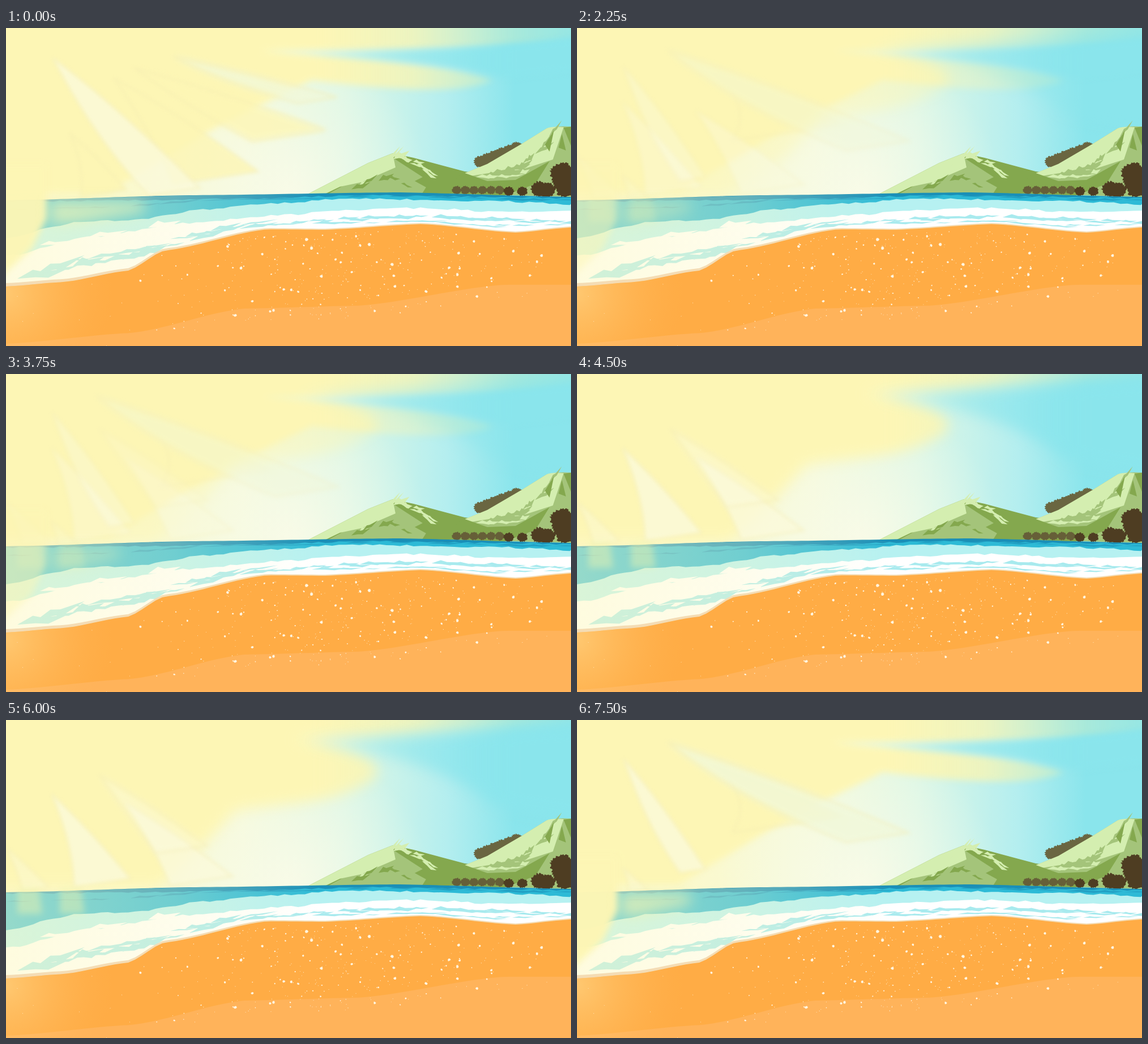
Write an HTML page that moves like this. It is 998 px wide and 561 px high and loops after 8 s.

```html
<!DOCTYPE html>
<html lang="en">
<head>
<meta charset="utf-8">
<title>Sunlit beach</title>
<style>
  html, body { margin: 0; width: 100%; height: 100%; overflow: hidden; background: #fdf6b5; }
  svg { display: block; width: 100%; height: 100%; }
</style>
</head>
<body>
<script>
const STEP = 750, LOOP = 8000, WIDTH = 998, HEIGHT = 561;
const YELLOW = '#fdf6b5', PALE = '#fbfadb', MINT = '#f1f8d9', BLUE = '#8ae5ec';
const DEEP = '#1a8fb7', TEAL = '#2dbad6', AQUA = '#b6f1f1', FOAM_SHADE = '#a8eaee';
const LEAF_LIGHT = '#d4eeb0', LEAF_MID = '#a4c47a', LEAF_DARK = '#84a84e';

let seed = 11;
const random = () => (seed = (seed * 16807) % 2147483647) / 2147483647;
const spread = amount => (random() * 2 - 1) * amount;
const times = (n, make) => Array.from({ length: n }, (_, i) => make(i)).join('');
const parse = text => text.split(' ').map(pair => pair.split(',').map(Number));
const path = (d, fill, extra = '') => `<path d="${d}" fill="${fill}" ${extra}/>`;
const soft = (d, fill, blur, opacity = 1) => path(d, fill, `filter="url(#blur${blur})" opacity="${opacity}"`);
const below = d => `${d}V${HEIGHT}H0Z`;

// Eased height along a few key points.
function heightAt(points, x) {
  const i = Math.max(1, points.findIndex(p => p[0] >= x));
  const [x0, y0] = points[i - 1], [x1, y1] = points[i], f = (x - x0) / (x1 - x0);
  return y0 + (y1 - y0) * (f + f * f * (3 - 2 * f)) / 2;
}

// Edge across the whole stage; jitter makes it look torn.
function edge(text, jitter = 0, shift = () => 0) {
  const points = parse(text);
  let d = '';
  for (let x = 0; x < WIDTH + 12; x += 12) {
    const px = Math.min(x, WIDTH);
    d += `${d ? 'L' : 'M'}${px} ${heightAt(points, px) + spread(jitter) + shift(px)}`;
  }
  return d;
}

// Thin ragged slivers scattered along a line of key points.
function slivers(text, step, length, thick) {
  const points = parse(text);
  let d = '';
  for (let x = points[0][0]; x < points.at(-1)[0]; x += step * (.6 + random() * .8)) {
    const slope = heightAt(points, Math.min(x + 1, points.at(-1)[0])) - heightAt(points, x);
    const l = length * (.5 + random()), t = thick * (.5 + random());
    const by = (f, rise) => `l${l * f} ${l * f * slope + rise}`;
    d += `M${x} ${heightAt(points, x) + spread(thick / 2)}` +
      by(.3, -t) + by(.2, t / 2) + by(.5, 0) + by(-.4, t) + by(-.25, -t / 3) + 'Z';
  }
  return d;
}

// Irregular round blob, used for pebbles and leaves.
const blob = (x, y, rx, ry, corners, rough) => 'M' + Array.from({ length: corners }, (_, i) => {
  const angle = i * 2 * Math.PI / corners, size = 1 + spread(rough);
  return `${x + Math.cos(angle) * rx * size} ${y + Math.sin(angle) * ry * size}`;
}).join('L') + 'Z';

const bushes = (n, from, to, r, fill) => path(times(n, i => {
  const f = n > 1 ? i / (n - 1) : 0;
  return blob(from[0] + (to[0] - from[0]) * f, from[1] + (to[1] - from[1]) * f, r * 1.15, r, 60, .13);
}), fill);

// Bent ray of light with a faint crease along its rim.
function blade(x, y, dx, dy, width, fill, blur = 3, opacity = .8) {
  const d = `M${x} ${y}q${dx * .45} ${dy * .38} ${dx} ${dy}l${-width} ${width * .15}Q${x + dx * .28} ${y + dy * .62} ${x} ${y}Z`;
  return soft(d, fill, blur, opacity) +
    `<path d="${d}" fill="none" stroke="#f3ebb2" stroke-width="4" filter="url(#blur3)" opacity=".4"/>`;
}

const stops = list => list.map(([at, color, alpha = 1]) =>
  `<stop offset="${at}" stop-color="${color}" stop-opacity="${alpha}"/>`).join('');
const across = (id, list) =>
  `<linearGradient id="${id}" gradientUnits="userSpaceOnUse" x1="0" x2="${WIDTH}" y1="0" y2="0">${stops(list)}</linearGradient>`;
const glow = (id, x, y, r, list) =>
  `<radialGradient id="${id}" gradientUnits="userSpaceOnUse" cx="${x}" cy="${y}" r="${r}">${stops(list)}</radialGradient>`;

const defs = '<defs>' +
  [3, 6, 12, 22].map(b => `<filter id="blur${b}" filterUnits="userSpaceOnUse" x="-100" y="-100" width="1200" height="760"
    color-interpolation-filters="sRGB"><feGaussianBlur stdDeviation="${b}"/></filter>`).join('') +
  across('sky', [[0, '#fdf8c4'], [.42, '#f8fad8'], [.6, '#def7e5'], [.78, '#b4eeef'], [.9, BLUE]]) +
  across('beam', [[0, YELLOW], [.55, YELLOW], [.72, '#f3f4b8', .85], [.86, '#d8f0c0', .5], [1, '#b8ecd0', .3]]) +
  across('gap', [[.5, BLUE, 0], [.7, BLUE, .55], [.9, BLUE]]) +
  across('haze', [[0, '#fdf8be', .5], [.3, '#fdf8c4', .32], [.56, '#fdf9d0', 0]]) +
  glow('mist', 500, 290, 250, [[0, '#fafbe8', .9], [1, '#f0faee', 0]]) +
  glow('warm', 0, 468, 190, [[0, '#ffe49c', .5], [1, '#ffb95a', 0]]) +
  '</defs>';

// Yellow cloud tongues split by a blue gap.
const tongues =
  soft('M-60 -60H1060V10C900 42 620 36 450 40C600 55 780 62 860 92C800 122 640 104 540 92L380 170 180 290H-60Z', 'url(#beam)', 6) +
  soft('M520 46C700 38 880 40 1040 12V70L880 88C760 56 640 56 520 46Z', 'url(#gap)', 6);
// One broad yellow body reaching down to the given edge.
const body = edgeX =>
  soft(`M-60 -60H1060V0C880 24 660 26 510 34C600 48 680 70 650 104C580 150 500 145 ${edgeX + 60} 160L${edgeX} 225 270 295H-60Z`, 'url(#beam)', 12) +
  soft('M520 40C680 28 860 24 1040 4V180L860 150C780 80 640 52 520 40Z', 'url(#gap)', 12);
const peaks = blade(80, 130, 140, 150, 100, PALE) + blade(210, 146, 190, 130, 110, PALE) + blade(0, 225, 75, 70, 45, PALE, 3, .4);

const skies = {
  A: tongues + blade(225, 70, 340, 110, 130, YELLOW, 6) + blade(295, 50, 290, 72, 70, MINT, 6) +
    blade(190, 88, 255, 165, 150, YELLOW) + blade(82, 52, 260, 230, 90, PALE) + blade(112, 185, 100, 100, 80, YELLOW),
  C: body(370) + peaks,
  K: body(345) + peaks + blade(165, 97, 190, 125, 90, PALE, 6, .45),
  D: tongues + blade(250, 85, 215, 85, 190, YELLOW, 6) + blade(160, 39, 425, 160, 110, MINT, 6) +
    blade(82, 68, 145, 195, 45, PALE) + blade(80, 260, 45, 40, 35, PALE, 3, .4),
  E: body(345) + soft('M-60 -60H440L480 130 300 300H-60Z', '#fefcce', 22, .8) +
    blade(-20, 30, 242, 185, 90, '#fbf6b9') + blade(290, 20, 195, 50, 90, '#faf6b9', 6) + blade(90, 150, 70, 140, 65, '#fffde4', 12)
};

const sun = opacity => soft('M-60 240H72V335L45 390 -10 440H-60Z', YELLOW, 6, opacity);
const glints = (n, tint) => soft(times(n, i => `M${20 + i * 75} 296h38l6 46h-44Z`), tint, 6, .45);
const hazes = {
  A: sun(.95) + soft('M78 306H245V325L120 345H78Z', '#eef4b8', 12, .7),
  C: glints(2, '#eff4ae'),
  K: glints(2, '#eff4ae'),
  D: sun(.98) + soft('M78 306H200V325L110 345H78Z', '#eef3b4', 12, .7),
  E: glints(3, '#e9f6c4')
};

const mountains =
  bushes(6, [838, 236], [902, 211], 10, '#6a6641') +
  path('M535 292L640 238 683 221 720 229 810 253 850 258V292Z', LEAF_DARK) +
  path('M570 292L685 230 736 263 722 270 742 281 735 292Z', LEAF_MID) +
  path('M535 292L640 238 683 221 688 246 628 272 590 280 565 292Z', LEAF_LIGHT) +
  path(slivers('625,280 650,258 685,230', 9, 22, 7) + slivers('683,226 720,238 750,256', 9, 20, 5), LEAF_LIGHT) +
  path(slivers('610,287 640,272 670,264 720,282', 26, 24, 6), LEAF_DARK) +
  path('M808 257L850 240 910 205 955 177Q975 172 998 174V298L790 292Z', LEAF_MID) +
  path('M808 257L850 240 910 205 955 177Q965 173 985 175L966 232 910 250 865 254 815 262Z', LEAF_LIGHT) +
  path('M765 291L808 255 850 270 900 268 960 235 935 275 880 296Z', LEAF_DARK) +
  path(slivers('850,258 900,248 940,222 962,190', 12, 24, 6), LEAF_MID) +
  path(slivers('830,263 880,264 930,254', 22, 26, 5), LEAF_LIGHT) +
  path('M952 206L968 180 960 218Z M985 176L998 174V208Z M982 187L989 216 976 211Z', LEAF_DARK) +
  bushes(6, [796, 286], [872, 286], 7, '#665f38') + bushes(2, [888, 288], [912, 288], 8, '#4e3d22') +
  bushes(2, [942, 284], [955, 286], 13, '#4e3d22') + bushes(3, [982, 256], [990, 280], 18, '#4e3d22');

const shore = '0,450 100,443 215,424 280,389 460,353 560,354 735,344 900,359 998,350';
const dune = '0,557 220,538 420,495 620,490 880,453 998,453';
const wetSand = x => 6 - 4 * Math.min(1, x / 500);
const sea =
  path(below(edge('0,304 330,295 690,290 998,298')), DEEP) +
  path(below(edge('0,306 260,304 420,301 640,295 998,300', 1.2)), TEAL) +
  path(slivers('0,320 180,318 350,305 690,297 980,303', 60, 70, 2.5), DEEP, 'opacity=".6"') +
  path(below(edge('0,371 92,349 135,341 215,340 350,320 480,309 600,301 860,305 998,311', 1.5)), AQUA) +
  path(below(edge('0,403 138,370 312,345 470,331 600,322 740,317 870,325 998,321', 1.8)), '#fff') +
  path(slivers('60,386 130,374 270,352', 80, 65, 7), '#fff') +
  path(slivers('20,443 90,424 160,414 245,396', 28, 65, 9) + slivers('110,412 260,388 420,353', 40, 60, 4) +
    slivers('290,372 430,348 600,338 720,334 998,343', 26, 50, 4) +
    slivers('540,346 720,341 850,349 998,347', 40, 45, 2.5), FOAM_SHADE);

const sandEdge = below(edge(shore, 0, wetSand));
const sand = path(below(edge(shore)), '#f4dcb4') + path(sandEdge, '#ffac45') + path(below(edge(dune)), '#ffb35a');

const shorePoints = parse(shore), dunePoints = parse(dune);
const specks = times(400, i => {
  const x = i % 8 ? 200 + (random() + random()) * 385 : random() * WIDTH;
  const top = heightAt(shorePoints, x) + 9, bottom = heightAt(dunePoints, x) + 22;
  const r = .5 + 2.4 * random() ** 4;
  return blob(x, top + (bottom - top) * random() ** 1.2, r, r, 6, .25);
});

const names = Object.keys(skies);
const layer = (kind, content) => names.map(n => `<g id="${kind}${n}">${content(n)}</g>`).join('');
const fill = id => `<rect width="${WIDTH}" height="${HEIGHT}" fill="url(#${id})"/>`;
document.body.innerHTML = `<svg viewBox="0 0 ${WIDTH} ${HEIGHT}" preserveAspectRatio="none">${defs}
  ${layer('sky', n => fill('sky') + fill('mist') + skies[n])}
  ${mountains}${sea}
  ${path('M0 304L330 295 600 290V461H0Z', 'url(#haze)')}
  ${sand}${path(sandEdge, 'url(#warm)')}
  ${layer('haze', n => hazes[n])}
  ${path(specks, '#fff5df')}</svg>`;

// A pair of letters is a pose halfway between two light patterns.
const poses = ['A', 'AC', 'C', 'CD', 'D', 'KD', 'K', 'E', 'K', 'KD', 'D'];
const groups = names.map(n => [n, document.getElementById('sky' + n), document.getElementById('haze' + n)]);
let shown = '';
function draw(now) {
  const pose = poses[Math.floor(now % LOOP / STEP)];
  if (pose !== shown) {
    for (const [name, sky, haze] of groups) {
      const at = pose.indexOf(name);
      sky.style.display = haze.style.display = at < 0 ? 'none' : '';
      sky.style.opacity = at > 0 ? .5 : 1;
      haze.style.opacity = 1 / pose.length;
    }
    shown = pose;
  }
  requestAnimationFrame(draw);
}
draw(performance.now());
</script>
</body>
</html>
```
